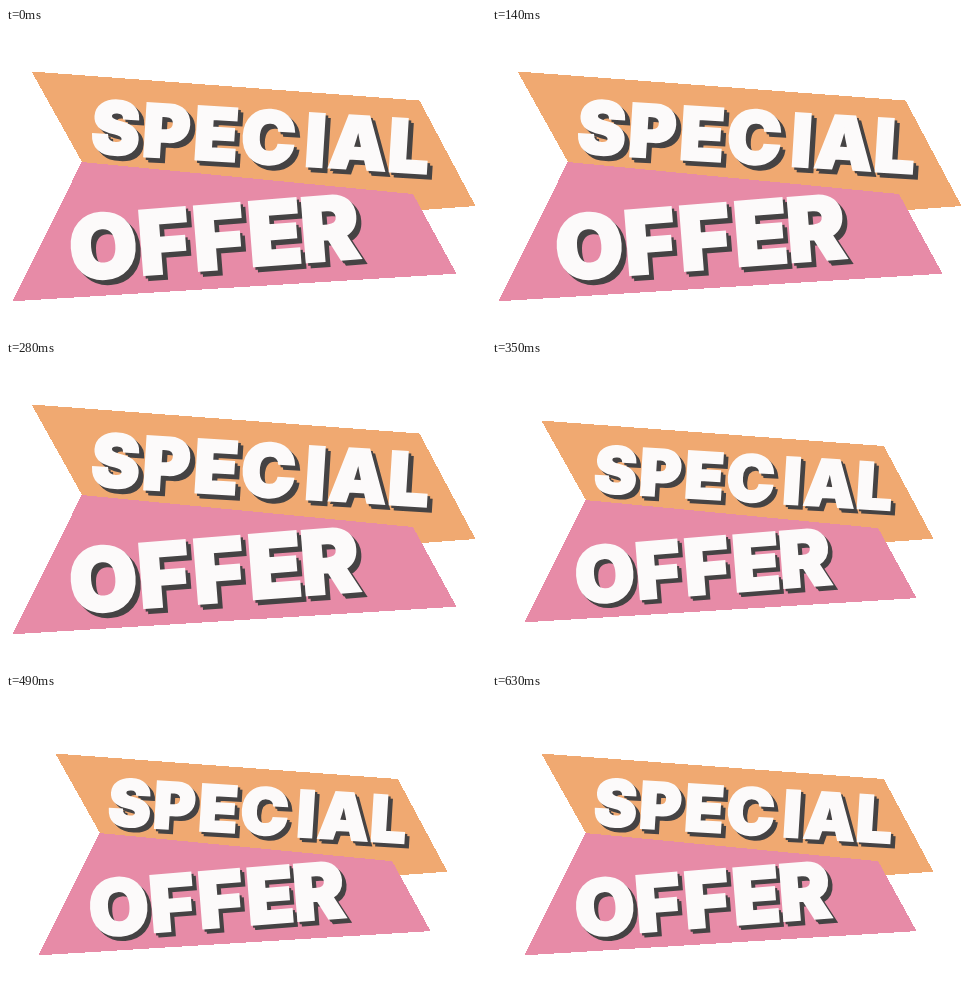
Recreate the animation shown at these times as an HTML page. Size 480 px wide and 305 px high, loop 0.7 s.

```html
<!DOCTYPE html>
<html lang="en">
<head>
<meta charset="utf-8">
<title>Special offer</title>
<style>
  html, body { margin: 0; width: 100%; height: 100%; overflow: hidden; background: #fff; }
  svg { display: block; width: 100vw; height: 100vh; }
  text { font-family: Inter, "Open Sans", sans-serif; font-weight: 900; stroke-width: 2.4; }
  polygon { shape-rendering: crispEdges; }
  .sign { animation: pulse 700ms step-end infinite; }
  .shade { fill: #454344; stroke: #454344; }
  .face { fill: #fcfafa; stroke: #fcfafa; }
  @keyframes pulse {
    0% { transform: none; }
    50% { transform: translate(26.8px, 21.4px) scale(.883, .878); }
  }
</style>
</head>
<body>
<svg viewBox="0 0 480 305">
  <defs>
    <g id="words">
      <text transform="translate(85 124.9) rotate(3.5)" font-size="73" x="-1 50 101.5 149 213 237 296">SPECIAL</text>
      <text transform="translate(67.5 252.5) rotate(-4.5)" font-size="88.5" x="-2 67 122 177 230">OFFER</text>
    </g>
  </defs>
  <g class="sign">
    <polygon fill="#f0a971" points="25.5,43.5 413.5,72.5 469.5,178 416,182 76,134"/>
    <polygon fill="#e78ba7" points="75.7,134 407,166 450.5,245.7 6.5,273.3"/>
    <use href="#words" class="shade" x="5" y="5"/>
    <use href="#words" class="shade" x="2.5" y="2.5"/>
    <use href="#words" class="face"/>
  </g>
</svg>
</body>
</html>
```
